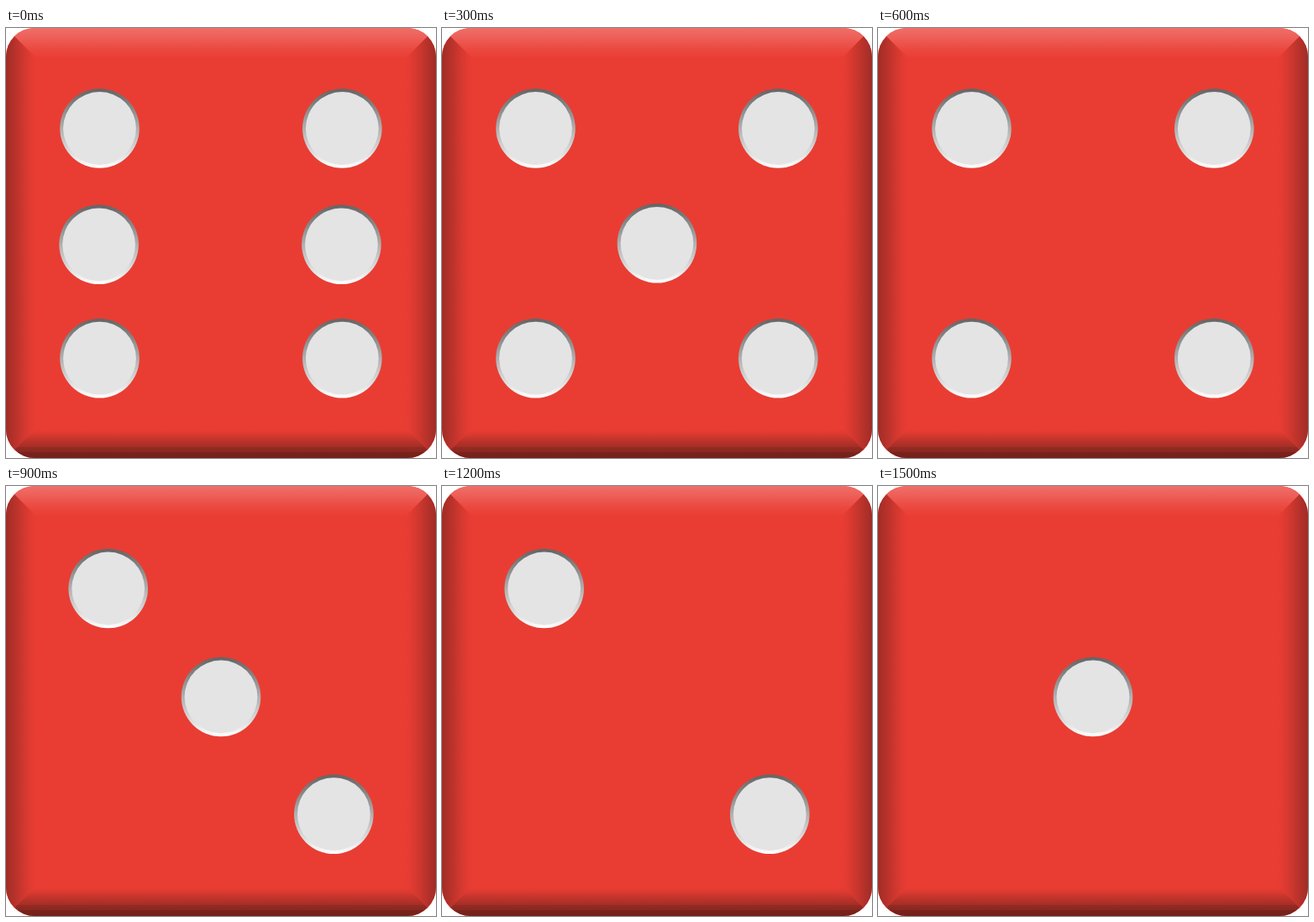
Animation of 512 by 512 pixels, one loop 1.8 s. Source, as an HTML page with a canvas:

```html
<!DOCTYPE html>
<html lang="en">
<head>
<meta charset="utf-8">
<title>Die countdown</title>
<style>
  html, body { margin: 0; width: 100%; height: 100%; overflow: hidden; background: #fff; }
  canvas { display: block; width: 100vw; height: 100vh; }
</style>
</head>
<body>
<canvas id="die" width="512" height="512"></canvas>
<script>
const ctx = document.getElementById('die').getContext('2d');
const SIZE = 512, BEVEL = 36, STEP = 300;
const RED = '#e93d33';

const corners = [[111.5, 119.5], [400.3, 119.5], [111.5, 393.2], [400.3, 393.2]];
const diagonal = [[121.7, 122], [390.3, 390.7]];
const middle = [256, 251];
const faces = [
  [...corners, [110.6, 257.8], [399.4, 257.8]],
  [...corners, [256, 256.3]],
  corners,
  [...diagonal, middle],
  diagonal,
  [middle]
];

function gradient(x0, y0, x1, y1, stops) {
  const g = ctx.createLinearGradient(x0, y0, x1, y1);
  for (const [at, color] of stops) g.addColorStop(at, color);
  return g;
}

// One mitred edge, drawn as the top edge turned by quarter turns
function edge(turns, stops) {
  ctx.save();
  ctx.translate(SIZE / 2, SIZE / 2);
  ctx.rotate(turns * Math.PI / 2);
  ctx.translate(-SIZE / 2, -SIZE / 2);
  ctx.beginPath();
  ctx.moveTo(0, 0);
  ctx.lineTo(SIZE, 0);
  ctx.lineTo(SIZE - BEVEL, BEVEL);
  ctx.lineTo(BEVEL, BEVEL);
  ctx.closePath();
  ctx.fillStyle = gradient(0, 0, 0, BEVEL, stops);
  ctx.fill();
  ctx.restore();
}

function body() {
  const side = [[0, '#a02d26'], [0.25, '#b3312a'], [0.55, '#cd372e'], [0.8, '#e03b32'], [1, RED]];
  ctx.save();
  ctx.beginPath();
  ctx.roundRect(0, 0, SIZE, SIZE, 34);
  ctx.clip();
  ctx.fillStyle = RED;
  ctx.fillRect(0, 0, SIZE, SIZE);
  edge(0, [[0, '#ef6f68'], [0.3, '#ed6059'], [0.65, '#eb4b42'], [1, RED]]);
  edge(1, side);
  edge(3, side);
  edge(2, [
    [0, '#74211b'], [0.19, '#7a221c'], [0.2, '#8a2720'], [0.35, '#942a23'],
    [0.37, '#a42e26'], [0.6, '#c1342b'], [0.82, '#de3a31'], [0.95, RED], [1, RED]
  ]);
  ctx.restore();
}

function disc(x, y, r, fill) {
  ctx.beginPath();
  ctx.arc(x, y, r, 0, Math.PI * 2);
  ctx.fillStyle = fill;
  ctx.fill();
}

function pip([x, y]) {
  const r = 47.3;
  disc(x, y, r, gradient(0, y - r, 0, y + r, [
    [0, '#646464'], [0.2, '#818181'], [0.5, '#b0b0b0'], [0.8, '#dddddd'], [1, '#ffffff']
  ]));
  disc(x, y, 43.4, '#e4e4e4');
}

function draw(ms) {
  ctx.clearRect(0, 0, SIZE, SIZE);
  body();
  faces[Math.floor(ms / STEP) % faces.length].forEach(pip);
}

const start = performance.now();
function tick() {
  draw(performance.now() - start);
  requestAnimationFrame(tick);
}
tick();
</script>
</body>
</html>
```
